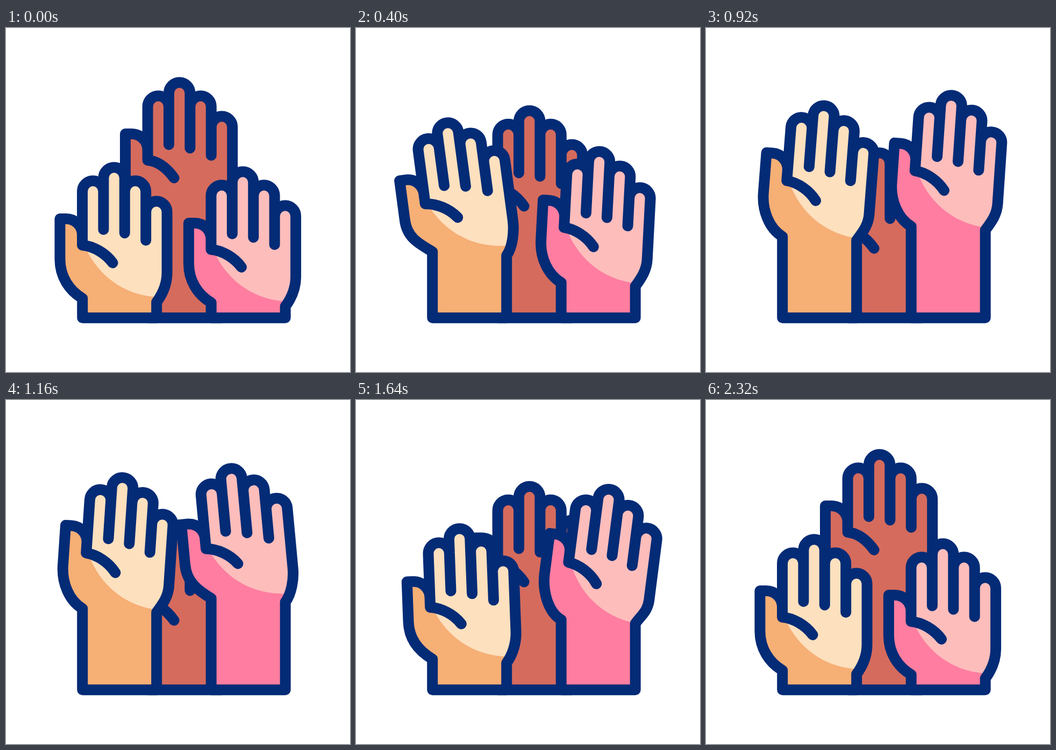
Animation of 640x640 px, one loop 3 s. Source, as an HTML page:

```html
<!DOCTYPE html>
<html lang="en">
<head>
<meta charset="utf-8">
<title>Raised hands</title>
<style>
html, body { margin: 0; width: 100%; height: 100%; overflow: hidden; background: #fff; }
svg { display: block; width: 100%; height: 100%; }
.line { fill: none; stroke: #042b76; stroke-width: 20; stroke-linecap: round; stroke-linejoin: round; }
</style>
</head>
<body>
<svg id="stage" viewBox="0 0 640 640"></svg>
<script>
const LOOP = 3000, STEP = 40;
const FLOOR = 539.3, BOUNCE = 12, FINGER = 39.4;
const PIVOT = { x: 211, y: 509 };
const stage = document.getElementById('stage');

// travel: distance moved (negative is up); rise and fall: when it leaves and returns;
// sway: direction of the wave; wait: delay of the wave
const hands = [
  { dx: 121.6, dy: -158, tip: 191, skin: '#d56b5d', shade: '#d56b5d',
    travel: 131, rise: 175, fall: 1390, sway: 0, wait: 80 },
  { dx: 0, dy: 0, tip: 198.5, skin: '#fde0be', shade: '#f6af75',
    travel: -115, rise: 70, fall: 1310, sway: 1, wait: 0 },
  { dx: 239.5, dy: 8, tip: 198.5, skin: '#fdbdbb', shade: '#fe7da0',
    travel: -142, rise: 216, fall: 1470, sway: -1, wait: 160 }
];

function addPath(attrs) {
  const el = document.createElementNS('http://www.w3.org/2000/svg', 'path');
  for (const name in attrs) el.setAttribute(name, attrs[name]);
  stage.appendChild(el);
  return el;
}

for (const h of hands) {
  h.base = addPath({ fill: h.shade });
  h.palm = addPath({ fill: h.skin });
  h.edge = addPath({ class: 'line' });
}

// Eased 0 to 1 between two times
function ease(t, from, to) {
  const u = Math.min(1, Math.max(0, (t - from) / (to - from)));
  return (1 - Math.cos(Math.PI * u)) / 2;
}

// Wind up, move away, come back a little too far, settle
function liftAt(h, t) {
  const extra = -Math.sign(h.travel) * BOUNCE, back = h.fall + 500;
  return extra * ease(t, h.rise - 70, h.rise)
    + (h.travel - extra) * ease(t, h.rise, h.rise + 480)
    + (extra - h.travel) * ease(t, h.fall, back)
    - extra * ease(t, back, back + 350);
}

// Wave out, in, out again and back upright
function tiltAt(h, t) {
  const s = t - h.wait;
  return h.sway * (15.3 * (ease(s, 590, 980) - ease(s, 1120, 1320))
    - 10 * (ease(s, 45, 575) - ease(s, 1320, 1780)));
}

function drawHand(h, t) {
  const lift = liftAt(h, t), a = tiltAt(h, t) * Math.PI / 180;
  const cos = Math.cos(a), sin = Math.sin(a);
  const put = (x, y) => (x + h.dx).toFixed(2) + ' ' + y.toFixed(2) + ' ';
  // wrist points only move up and down; hand points also turn
  const wrist = (x, y) => put(x, y + h.dy + lift);
  const hand = (x, y) => {
    const u = x - PIVOT.x, v = y - PIVOT.y;
    return wrist(PIVOT.x + u * cos - v * sin, PIVOT.y + u * sin + v * cos);
  };
  const arc = (r, x, y) => `A${r} ${r} 0 0 1 ` + hand(x, y);
  const gap = i => 142 + i * FINGER;

  let fingers = '';
  [304, 279, 304, 342].forEach((y, i) => {
    fingers += 'L' + hand(gap(i), y) + arc(FINGER / 2, gap(i + 1), y);
  });
  fingers += 'L' + hand(gap(4), 455);

  const outline = 'M' + hand(100.4, 355) + 'L' + hand(112, 355) + arc(30, 142, 385) + fingers
    + 'C' + hand(299.6, 475) + wrist(292, 494) + wrist(280.2, 510)
    + 'L' + put(280.2, FLOOR) + 'L' + put(142.2, FLOOR) + 'L' + wrist(142.2, 503)
    + 'C' + wrist(117, 488) + hand(100.4, 462) + hand(100.4, 430) + 'Z';

  const palm = 'M' + hand(142, 395) + fingers + 'Q' + hand(299.6, 480) + hand(286, 501)
    + 'C' + hand(211, 498) + hand(163, 451) + hand(142, 395) + 'Z';

  let creases = 'M' + hand(142, 320) + 'L' + hand(142, 404)
    + 'C' + hand(163, 406) + hand(h.tip - 13, 419) + hand(h.tip, 437);
  [375, 381.5, 395].forEach((y, i) => {
    creases += 'M' + hand(gap(i + 1), 304) + 'L' + hand(gap(i + 1), y);
  });

  h.base.setAttribute('d', outline);
  h.palm.setAttribute('d', palm);
  h.edge.setAttribute('d', outline + creases);
}

function render(ms) {
  const t = Math.floor((ms % LOOP) / STEP) * STEP;
  for (const h of hands) drawHand(h, t);
}

const start = performance.now();
function tick() {
  render(performance.now() - start);
  requestAnimationFrame(tick);
}
tick();
</script>
</body>
</html>
```
